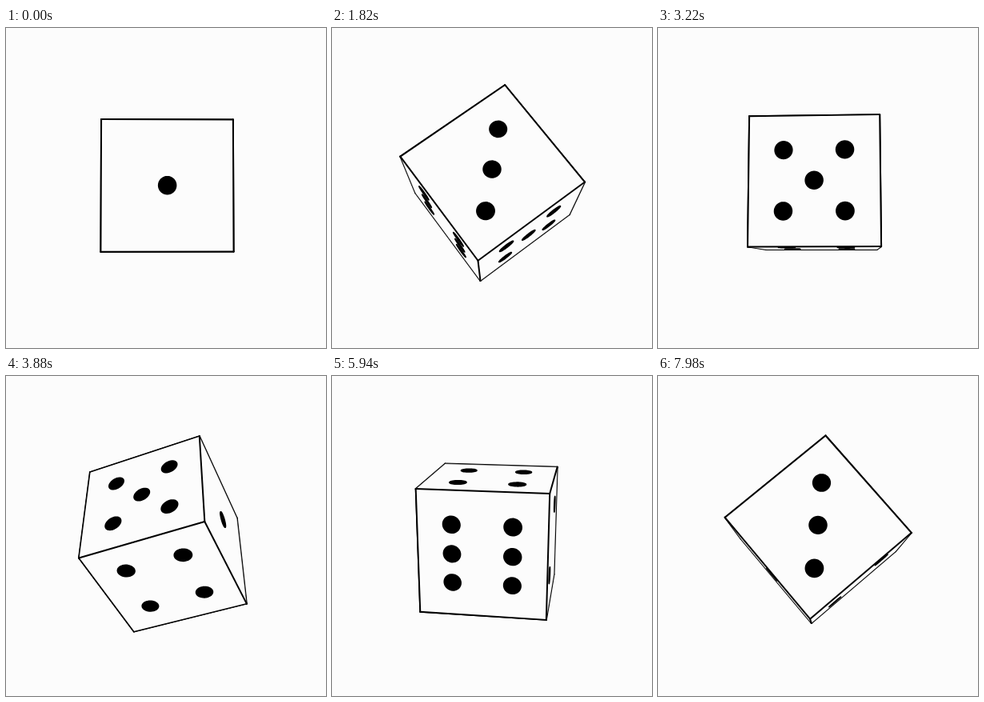
An HTML page with a canvas that plays this animation: 400x400 px, repeating every 8 s.

```html
<!DOCTYPE html>
<html lang="en">
<head>
<meta charset="utf-8">
<title>Rolling die</title>
<style>
  html, body { margin: 0; width: 100%; height: 100%; overflow: hidden; background: #fcfcfc; }
  canvas { display: block; width: 400px; height: 400px; }
</style>
</head>
<body>
<canvas id="stage" width="400" height="400"></canvas>
<script>
const ctx = document.getElementById('stage').getContext('2d');

const SIZE = 400, STEP = 20, STEPS = 400;
const CAMERA = 800;                     // eye distance and focal length
const HALF = 75;                        // half an edge of the cube
const GAP = 35, PIP = 10;
const LINE = 2, PIP_LINE = 1.5;
const PAPER = '#fcfcfc', INK = '#000';

const CENTRE = [[0, 0]];
const RISING = [[1, 1], [-1, -1]];
const FALLING = [[1, -1], [-1, 1]];
const CORNERS = [...RISING, ...FALLING];
const SIDES = [[1, 0], [-1, 0]];
const OUTLINE = [[-1, -1], [1, -1], [1, 1], [-1, 1]];

// axis: direction of the normal; pips lie along the other two axes
const FACES = [
  { axis: 2, sign: 1, pips: CENTRE },
  { axis: 0, sign: -1, pips: RISING },
  { axis: 1, sign: -1, pips: [...CENTRE, ...FALLING] },
  { axis: 1, sign: 1, pips: CORNERS },
  { axis: 0, sign: 1, pips: [...CENTRE, ...CORNERS] },
  { axis: 2, sign: -1, pips: [...CORNERS, ...SIDES] }
];

function rotate([x, y, z], a, b) {
  const x1 = x * Math.cos(b) + z * Math.sin(b);
  const z1 = z * Math.cos(b) - x * Math.sin(b);
  return [x1, y * Math.cos(a) - z1 * Math.sin(a), y * Math.sin(a) + z1 * Math.cos(a)];
}

function project([x, y, z]) {
  const scale = CAMERA / (CAMERA - z);
  return [SIZE / 2 + x * scale, SIZE / 2 - y * scale];
}

function facePoint(face, u, v) {
  const p = [u, v];
  p.splice(face.axis, 0, face.sign * HALF);
  return p;
}

function trace(points) {
  ctx.beginPath();
  points.forEach(p => ctx.lineTo(...p));
}

function fillShape(points, colour) {
  trace(points);
  ctx.closePath();
  ctx.fillStyle = colour;
  ctx.fill();
}

function strokeShape(points, width) {
  trace(points);
  ctx.lineWidth = width;
  ctx.stroke();
}

function draw(step) {
  const a = -0.02 * (step + 2);
  const b = 0.01 * (step + 2);
  const view = p => project(rotate(p, a, b));
  const edges = new Map();
  const visible = [];

  for (const face of FACES) {
    const depth = rotate(facePoint(face, 0, 0), a, b)[2];
    if (depth * CAMERA <= HALF * HALF) continue;

    const corners = OUTLINE.map(([u, v]) => facePoint(face, u * HALF, v * HALF));
    visible.push({ face, shape: corners.map(view) });

    corners.forEach((p, i) => {
      const q = corners[(i + 1) % 4];
      const key = [p, q].map(String).sort().join('|');
      // the inner half of an outer edge sinks into a steep face
      const inner = edges.has(key) ? 1 : depth / HALF;
      edges.set(key, { ends: [view(p), view(q)], inner });
    });
  }

  ctx.fillStyle = PAPER;
  ctx.fillRect(0, 0, SIZE, SIZE);
  ctx.strokeStyle = INK;
  ctx.lineCap = ctx.lineJoin = 'round';

  for (const { ends } of edges.values()) strokeShape(ends, LINE);
  for (const { shape } of visible) fillShape(shape, PAPER);
  for (const { ends, inner } of edges.values()) strokeShape(ends, LINE * inner);

  for (const { face } of visible) {
    for (const [u, v] of face.pips) {
      const ring = Array.from({ length: 37 }, (_, i) => {
        const t = i * Math.PI / 18;
        return view(facePoint(face, u * GAP + PIP * Math.cos(t), v * GAP + PIP * Math.sin(t)));
      });
      fillShape(ring, INK);
      strokeShape(ring, PIP_LINE);
    }
  }
}

function tick() {
  draw(Math.floor(performance.now() / STEP) % STEPS);
  requestAnimationFrame(tick);
}
tick();
</script>
</body>
</html>
```
